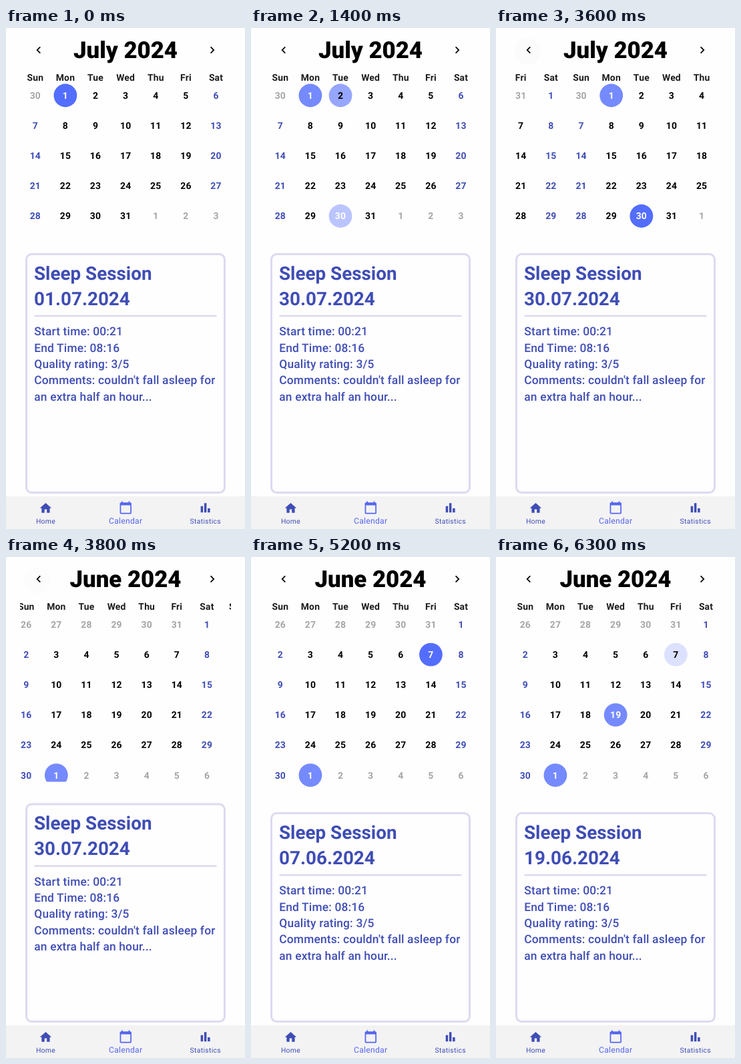
Animation, 358 px wide and 750 px high, one loop 7300 ms. Source, as an HTML page:

```html
<!DOCTYPE html>
<html lang="en">
<head>
<meta charset="utf-8">
<title>Sleep calendar</title>
<style>
  html, body { margin: 0; width: 100%; height: 100%; overflow: hidden; background: #fefefe; }
  svg { display: block; width: 358px; height: 750px; font-family: Roboto, sans-serif; text-rendering: geometricPrecision; }
  .mid { text-anchor: middle; }
  .title { font-size: 34.76px; font-weight: 900; fill: #000; }
  .dow { font-size: 13.9px; font-weight: 600; letter-spacing: .2px; fill: #1c1c1c; }
  .day { font-size: 13.9px; font-weight: 700; letter-spacing: .2px; }
  .ink { fill: #3f4db5; }
  .head { font-size: 27.8px; font-weight: 700; }
  .body { font-size: 17.38px; font-weight: 500; letter-spacing: .17px; }
  .nav { font-size: 10.43px; letter-spacing: .3px; }
  .active { font-size: 12.17px; letter-spacing: .25px; fill: #5566ee; }
</style>
</head>
<body>
<svg viewBox="0 0 358 750">
  <defs>
    <clipPath id="view"><rect id="viewBox" x="21" y="60" width="316" height="245"/></clipPath>
  </defs>
  <rect width="358" height="750" fill="#fefefe"/>
  <circle id="ripple" cx="47" cy="35" r="20" opacity="0"/>
  <path transform="translate(38.5 22.6) scale(.87)" d="M15.41 7.41 14 6l-6 6 6 6 1.41-1.41L10.83 12z"/>
  <path transform="translate(298.5 22.6) scale(.87)" d="M8.59 16.59 13.17 12 8.59 7.41 10 6l6 6-6 6z"/>
  <text id="title" class="mid title" x="179" y="45"></text>
  <g clip-path="url(#view)"><g id="pages"></g></g>

  <g id="card" class="ink">
    <rect id="frame" x="30.5" y="338.5" width="297" height="357" rx="8" fill="none" stroke="#dddaf1" stroke-width="3"/>
    <text class="head" x="42" y="376.5">Sleep Session</text>
    <text class="head" id="date" x="42" y="414.7"></text>
    <rect x="42.5" y="429.7" width="273" height="2.6" fill="#dddaf1"/>
    <g id="notes" class="body"></g>
  </g>

  <rect y="701" width="358" height="49" fill="#f3f3f4"/>
  <g class="mid ink nav">
    <path transform="translate(49 708.4) scale(.87)" d="M10 20v-6h4v6h5v-8h3L12 3 2 12h3v8z"/>
    <text x="59.5" y="742">Home</text>
    <path transform="translate(288.2 707.8) scale(.87)" d="M4 9h4v11H4zm12 4h4v7h-4zm-6-9h4v16h-4z"/>
    <text x="298.8" y="742">Statistics</text>
    <g class="active">
      <path transform="translate(168.8 707.6) scale(.87)" d="M20 3h-1V1h-2v2H7V1H5v2H4c-1.1 0-2 .9-2 2v16c0 1.1.9 2 2 2h16c1.1 0 2-.9 2-2V5c0-1.1-.9-2-2-2zm0 18H4V8h16v13z"/>
      <text x="179.2" y="742">Calendar</text>
    </g>
  </g>
</svg>
<script>
const LOOP = 7300, STEP = 100, FADE = 250;
const COL = 45.12, ROW = 45.12, PAGE = 316, X0 = 43.8, Y0 = 101;
const DAY = 864e5;
const $ = id => document.getElementById(id);
const date = (m, d) => Date.UTC(2024, m - 1, d);
const clamp = (v, lo = 0, hi = 1) => Math.min(hi, Math.max(lo, v));

function add(parent, tag, attrs, text) {
  const el = document.createElementNS('http://www.w3.org/2000/svg', tag);
  for (const k in attrs) el.setAttribute(k, attrs[k]);
  if (text !== undefined) el.textContent = text;
  parent.append(el);
  return el;
}

const today = date(7, 1);
// hold: time the fade stalls after its first step; cap: furthest age reached
const taps = [
  { at: -1000, day: date(7, 1) },
  { at: 100, day: date(7, 2) },
  { at: 1300, day: date(7, 30), hold: 400 },
  { at: 4500, day: date(6, 7) },
  { at: 5600, day: date(6, 19), hold: 200, cap: 200 }
];

const cells = [];
function buildPage(month, first, rows, x) {
  const page = add($('pages'), 'g', { transform: `translate(${x})` });
  ['Sun', 'Mon', 'Tue', 'Wed', 'Thu', 'Fri', 'Sat'].forEach((name, i) =>
    add(page, 'text', { class: 'mid dow', x: X0 + i * COL, y: 78.7 }, name));
  for (let i = 0; i < rows * 7; i++) {
    const day = first + i * DAY, when = new Date(day), col = i % 7;
    const cx = X0 + col * COL, cy = Y0 + Math.floor(i / 7) * ROW;
    const outside = when.getUTCMonth() !== month - 1;
    cells.push({
      day,
      ink: outside ? '#a5a5a5' : col % 6 ? '#000' : '#3f4db5',
      dot: add(page, 'circle', { cx, cy, r: 17.4, fill: '#536dfe' }),
      label: add(page, 'text', { class: 'mid day', x: cx, y: cy + 4.9 }, when.getUTCDate())
    });
  }
}
buildPage(6, date(5, 26), 6, -PAGE);
buildPage(7, date(6, 30), 5, 0);

['Start time: 00:21', 'End Time: 08:16', 'Quality rating: 3/5',
 "Comments: couldn't fall asleep for", 'an extra half an hour...'].forEach((line, i) =>
  add($('notes'), 'text', { x: 42.3, y: 460.2 + i * 24.35 }, line));

// cubic-bezier(0, 0, .58, 1)
function easeOut(x) {
  let lo = 0, hi = 1;
  for (let i = 0; i < 24; i++) {
    const u = (lo + hi) / 2;
    if (1.74 * u * u * (1 - u) + u ** 3 < x) lo = u; else hi = u;
  }
  return 3 * lo * lo - 2 * lo ** 3;
}

function fadeOf({ at, hold = 0, cap = FADE }, t) {
  const age = t - at;
  return clamp((age < 100 ? age : clamp(age - hold, 100, cap)) / FADE);
}

function draw(t) {
  const n = taps.findLastIndex(tap => t >= tap.at);
  const now = taps[n], before = taps[n - 1], p = fadeOf(now, t);

  for (const c of cells) {
    const on = c.day === now.day ? p : before && c.day === before.day ? 1 - p : 0;
    const base = c.day === today ? .8 : 0;
    c.dot.setAttribute('opacity', base + (1 - base) * on);
    c.label.setAttribute('fill', base || c.day === now.day ? '#fff' : c.ink);
  }
  $('date').textContent = new Date(now.day).toISOString().slice(0, 10).split('-').reverse().join('.');

  const slide = easeOut(clamp((t - 3549) / 300));
  const grow = ROW * clamp((t - 3660) / 200);
  $('pages').setAttribute('transform', `translate(${slide * PAGE})`);
  $('title').textContent = (slide < .5 ? 'July' : 'June') + ' 2024';
  $('viewBox').setAttribute('height', 245 + grow);
  $('card').setAttribute('transform', `translate(0 ${grow})`);
  $('frame').setAttribute('height', 357 - grow);
  $('ripple').setAttribute('opacity', t < 3600 ? 0 : .013 * clamp((4100 - t) / 400));
}

function tick() {
  const t = performance.now() % LOOP;
  draw(Math.floor(t / STEP) * STEP);
  requestAnimationFrame(tick);
}
tick();
</script>
</body>
</html>
```
